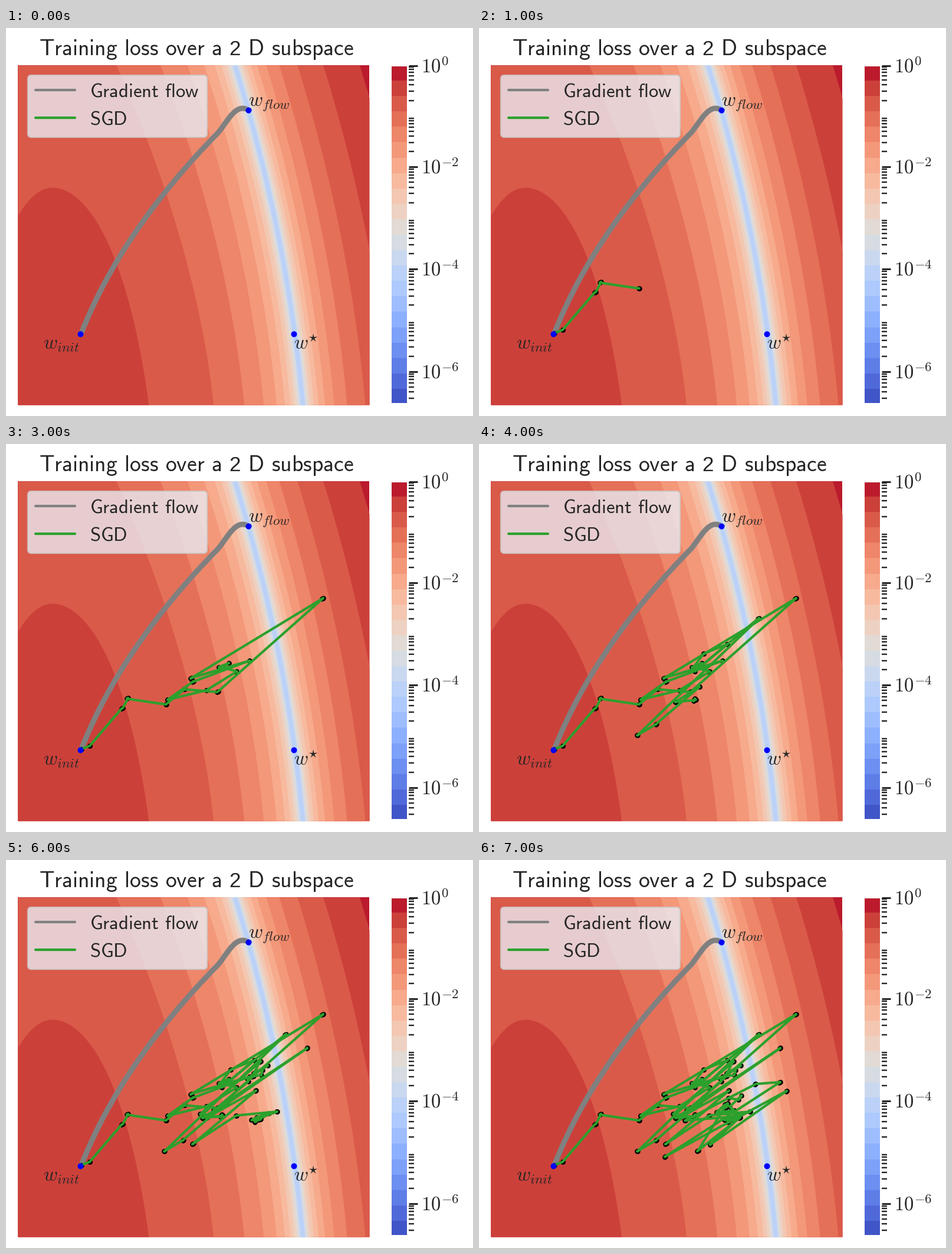
A matplotlib script that plays this animation: 792x657 px, repeating every 8000 ms.

```python
import numpy as np
import matplotlib.pyplot as plt
from matplotlib.animation import FuncAnimation
from matplotlib.patches import FancyBboxPatch, PathPatch, Rectangle
from matplotlib.path import Path

W, H, DPI = 792, 657, 100
PT = 72 / DPI  # points per pixel
LEFT, RIGHT, TOP, BOTTOM = 20, 616, 63, 638
INK, GREEN = "#262626", "#2ca02c"
BANDS, STEP = 22, 0.3

plt.rcParams["mathtext.fontset"] = "cm"
fig = plt.figure(figsize=(W / DPI, H / DPI), dpi=DPI, facecolor="white")
ax = fig.add_axes([0, 0, 1, 1])
ax.set(xlim=(0, W), ylim=(H, 0))
ax.axis("off")


def band_color(i):
    return plt.cm.coolwarm((i + 0.5) / BANDS)


def rect(x0, y0, x1, y1, color):
    ax.add_patch(Rectangle((x0, y0), x1 - x0, y1 - y0, fc=color, lw=0))


def label(x, y, tex, size=32.7, ha="left"):
    ax.text(x, y, f"${tex}$", fontsize=size * PT, color=INK, ha=ha,
            va="baseline", zorder=12)


def sans(words):
    return r"\mathsf{" + words.replace(" ", r"\hspace{0.38}") + "}"


# Loss surface: nested bands around a curved valley
ys = np.linspace(TOP, BOTTOM, 200)
up = (BOTTOM - ys) / (BOTTOM - TOP)
valley = 503 - 52 * up - 63 * up ** 2


def reach(exponent):
    return 106 * 10 ** ((exponent + 0.9) / 2)


def fill(x0, x1, color, y=ys):
    ax.fill_betweenx(y, np.clip(x0, LEFT, RIGHT), np.clip(x1, LEFT, RIGHT),
                     color=color, lw=0)


rect(LEFT, TOP, RIGHT, BOTTOM, band_color(21))
for i in (20, 19):
    fill(LEFT, valley + reach(STEP * (i - 21)), band_color(i))

hill_y = 270 + (BOTTOM - 270) * np.linspace(0, 1, 200) ** 2
arc = np.sqrt(1 - ((900 - hill_y) / 630) ** 2)
fill(78 - 152 * arc, 78 + 180 * arc, band_color(20), hill_y)

for i in range(18, 7, -1):
    r = reach(STEP * (i - 21))
    skew = (0.43 + 0.47 * up ** 1.6) * (r / 106) ** 0.8
    fill(valley - r * (1 + skew), valley + r, band_color(i))

# Colour bar
cell = (637 - TOP) / BANDS
for i in range(BANDS):
    y1 = 637 - i * cell
    rect(654, max(y1 - cell, 65), 680, min(y1, 635), band_color(i))


def bar_y(exponent):
    return 62 - 86.6 * exponent


def tick(y, length, width):
    ax.plot([683, 683 + length], [y, y], color=INK, lw=width * PT,
            solid_capstyle="butt")


for decade in range(-7, 0):
    for m in range(2, 10):
        y = bar_y(decade + np.log10(m))
        if y < 635:
            tick(y, 9, 2.4)
for e in (0, -2, -4, -6):
    y = max(bar_y(e), 63.5)
    tick(y, 15, 3)
    label(704.3, y + 11.5, f"10^{{{e}}}")

# Gradient flow
flow = Path([(128, 516), (196, 343.5), (360, 177),
             (376, 158), (390, 126), (411, 139)],
            [Path.MOVETO] + 2 * [Path.CURVE3] + 3 * [Path.CURVE4])
ax.add_patch(PathPatch(flow, fc="none", ec="gray", lw=9 * PT,
                       capstyle="projecting", zorder=4))

# Legend and texts
ax.add_patch(FancyBboxPatch((42, 85), 294, 95, boxstyle="round,pad=5,rounding_size=6",
                            fc="#eaeaf2", ec="#cccccc", lw=2.2 * PT, alpha=0.8, zorder=8))
for y, color, name in ((105, "gray", "Gradient flow"), (152, GREEN, "SGD")):
    ax.plot([50, 117], [y, y], color=color, lw=4.2 * PT,
            solid_capstyle="round", zorder=9)
    label(142, y + 11.5, sans(name))

# The math sans face has no digits, so the 2 is set on its own in a gap
label(55.5, 46.5, sans("Training loss over a") + r"\hspace{1.33}" + sans("D subspace"), 37.7)
ax.text(387.5, 46.5, "2", family="Liberation Sans", fontsize=35 * PT, color=INK,
        ha="center", va="baseline")
label(125, 543, "w_{init}", ha="right")
label(411, 131.5, "w_{flow}")
label(488, 543, "w")
label(512, 530.5, r"\star", 23)
ax.plot([126, 411, 488], [518, 139, 518], "o", color="blue", ms=10 * PT,
        mew=0, zorder=10)

# SGD walk: each second adds some leaps, then small hops around the last spot
rng = np.random.default_rng(4)
HOP = np.array([0.86, -0.5])


def stage(leaps, rests=0, spread=0):
    points = []
    for p in np.array(leaps, float):
        points += [p, p + HOP * rng.uniform(-3, 3)]
    for _ in range(rests):
        points.append(p + spread * (HOP * rng.normal() + rng.normal(0, 0.3, 2)))
    return points


stages = [
    stage([(126, 518), (142, 511), (196, 448), (207, 430), (271, 441)]),
    stage([(303, 415), (358, 420), (538, 261), (313, 397), (413, 367), (316, 403)]),
    stage([(274, 433), (340, 417), (390, 386), (366, 378)], 3, 9),
    stage([(381, 355), (421, 339), (366, 385), (473, 296), (269, 493),
           (301, 474), (374, 411), (333, 437), (364, 434)], 3, 4),
    stage([(330, 430), (432, 341), (418, 366)], 9, 16),
    stage([(354, 423), (510, 319), (341, 436), (423, 391), (318, 480),
           (390, 433), (460, 426), (430, 437)], 7, 9),
    stage([(350, 441), (468, 380), (511, 376), (316, 502), (522, 391),
           (392, 482), (441, 437), (370, 493), (420, 413)], 9, 18),
]
walk = np.array([p for s in stages for p in s])
shown = np.cumsum([0] + [len(s) for s in stages])

dots, = ax.plot([], [], "o", color="black", ms=8.6 * PT, mew=0, zorder=5)
trail, = ax.plot([], [], color=GREEN, lw=4.2 * PT, solid_capstyle="round",
                 solid_joinstyle="round", zorder=6)


def update(k):
    part = walk[:shown[k]]
    for line in (dots, trail):
        line.set_data(part[:, 0], part[:, 1])
    return dots, trail


anim = FuncAnimation(fig, update, frames=len(shown), interval=1000,
                     repeat=True, repeat_delay=0, blit=False)
plt.show()
```
